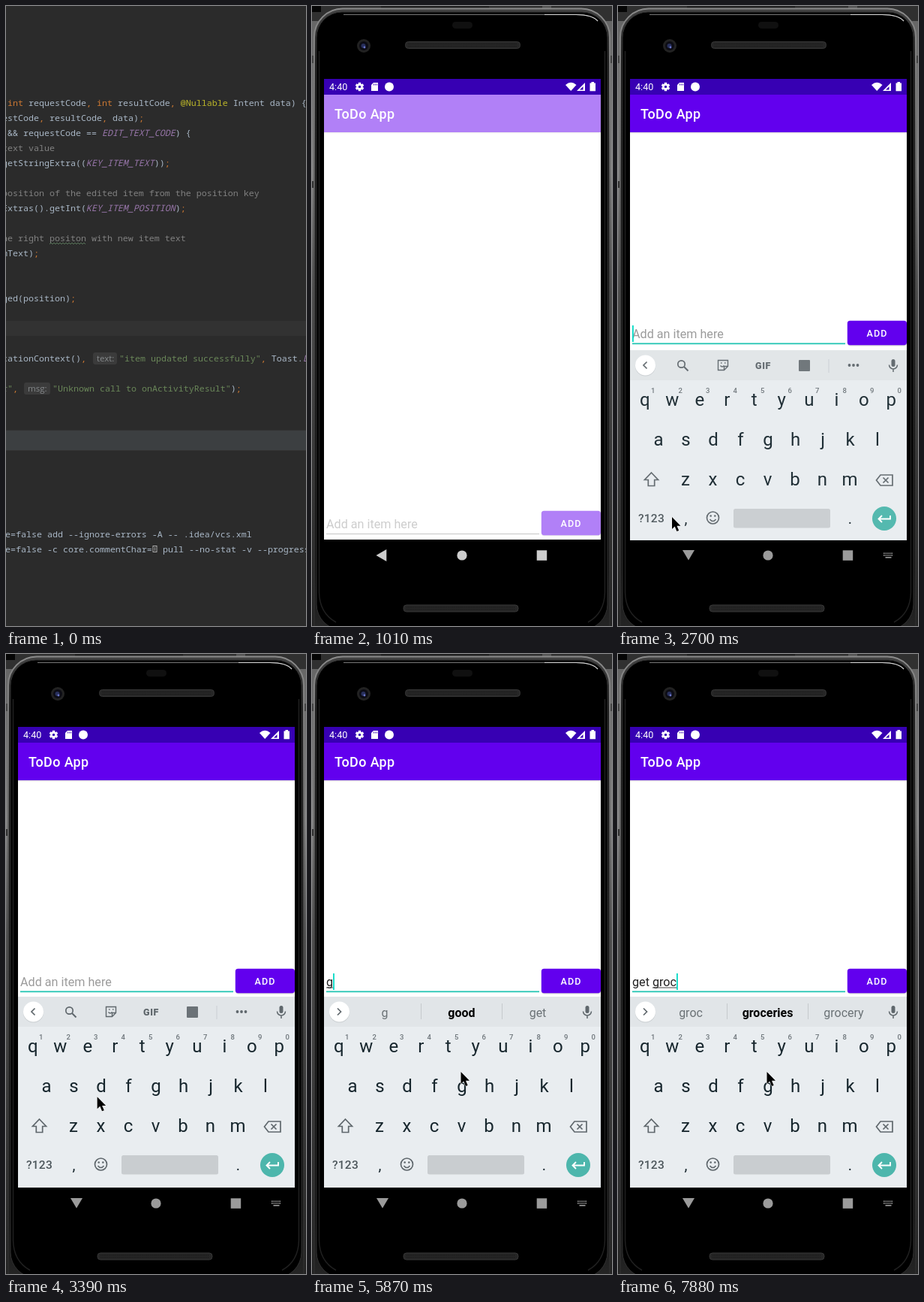
Write an HTML page that moves like this. It is 400x825 px and loops after 8 s.

```html
<!DOCTYPE html>
<html lang="en">
<head>
<meta charset="utf-8">
<title>To-do demo</title>
<style>
html, body { margin: 0; width: 100%; height: 100%; overflow: hidden; background: #2b2b2b; }
svg { display: block; width: 400px; height: 825px; }
text { white-space: pre; font-family: Roboto, sans-serif; }
.code text { font: 11.67px "Noto Sans Mono", monospace; fill: #a9b7c6; }
.code .hint { font: 11.5px "Open Sans", sans-serif; fill: #868a8c; }
.k { fill: #cc7832; } .a { fill: #bbb529; } .s { fill: #6a8759; } .c { fill: #808080; }
.f { fill: #9876aa; font-style: italic; }
.key { font-size: 24px; fill: #17262d; text-anchor: middle; }
.num { font-size: 9.5px; fill: #6c7479; text-anchor: middle; font-weight: 500; }
.word { font-size: 16px; fill: #6b7276; text-anchor: middle; }
.line { fill: none; stroke: #5f676c; stroke-width: 1.7; }
</style>
</head>
<body>
<svg id="stage" viewBox="0 0 400 825" xmlns="http://www.w3.org/2000/svg"></svg>
<script>
const stage = document.getElementById('stage');
const LOOP = 8000;

const rect = (x, y, w, h, fill, more = '') =>
  `<rect x="${x}" y="${y}" width="${w}" height="${h}" fill="${fill}" ${more}/>`;
const circle = (x, y, r, fill, more = '') =>
  `<circle cx="${x}" cy="${y}" r="${r}" fill="${fill}" ${more}/>`;
const path = (d, more = '') => `<path d="${d}" ${more}/>`;
const label = (x, y, s, more = '') => `<text x="${x}" y="${y}" ${more}>${s}</text>`;
const group = (id, body, more = '') => `<g id="${id}" ${more}>${body}</g>`;

// Code editor: ~x text~ marks a run of class x
const tint = s => s.replace(/~(\w) (.*?)~/g, '<tspan class="$1">$2</tspan>');
const row = (y, s, x = -5) => label(x, y, tint(s));
const chip = (x, y, w, s) =>
  rect(x, y, w, 16, '#3b3b3b', 'rx="3"') + label(x + 5, y + 12, s, 'class="hint"');

function editor() {
  return rect(0, 0, 400, 825, '#2b2b2b') + rect(0, 419, 400, 20, '#323232') +
    rect(0, 564, 400, 28, '#323232') + rect(0, 565, 400, 26, '#3c3f41') +
    row(133, '(~k int~ requestCode~k ,~ ~k int~ resultCode~k ,~ ~a @Nullable~ Intent data) {') +
    row(153, 'estCode~k ,~ resultCode~k ,~ data)~k ;~') +
    row(173, '&amp;&amp; requestCode == ~f EDIT_TEXT_CODE~) {', 2) +
    row(193, '~c text value~') +
    row(213, 'getStringExtra((~f KEY_ITEM_TEXT~))~k ;~') +
    row(253, '~c position of the edited item from the position key~') +
    row(273, 'Extras().getInt(~f KEY_ITEM_POSITION~)~k ;~') +
    row(313, '~c he right positon with new item text~') +
    path('M58 317' + 'l2 -2l2 2'.repeat(12), 'fill="none" stroke="#5f8060" stroke-width=".9"') +
    row(333, 'mText)~k ;~') +
    row(393, 'ged(position)~k ;~') +
    row(473, 'cationContext()~k ,~') + chip(116, 461, 32, 'text:') +
    row(473, '~s "item updated successfully"~~k ,~ Toast.~f LENGTH~', 151) +
    row(513, '~s r"~~k ,~') + chip(24, 501, 35, 'msg:') +
    row(513, '~s "Unknown call to onActivityResult"~)~k ;~', 62) +
    row(707, 'e=false add --ignore-errors -A -- .idea/vcs.xml', -1) +
    row(727, 'e=false -c core.commentChar=', -1) +
    rect(196, 718.5, 5, 8, 'none', 'stroke="#bbb" stroke-width=".9"') +
    path('M198.5 720v5', 'stroke="#999"') +
    row(727, 'pull --no-stat -v --progress', 209);
}

function speaker(x, y) {
  return rect(x, y, 153, 9, '#262626', 'rx="4" stroke="#363636" stroke-width="1"') +
    path(`M${x + 4} ${y + 3}h145M${x + 4} ${y + 6}h145`,
      'stroke="#171717" stroke-width="1.2" stroke-dasharray="1.2 1"');
}

function phone() {
  return rect(0, 0, 400, 825, '#303030') + rect(0, 0, 12, 8, '#050505') +
    rect(92, 0, 144, 3, '#202020') + rect(307, 0, 12, 8, '#555') +
    rect(0, 20, 8, 805, 'url(#side)') + rect(392, 20, 8, 805, 'url(#side)') +
    rect(0, 66, 5, 10, '#444') + rect(395, 66, 5, 10, '#444') + rect(0, 233, 5, 9, '#333') +
    rect(3, 3.5, 394, 880, 'url(#body)', 'rx="38" stroke="url(#rim)" stroke-width="2"') +
    rect(6, 8, 388, 822, '#000', 'rx="34" stroke="#303030" stroke-width="1"') +
    rect(9, 11, 382, 814, '#000', 'rx="31"') +
    path('M42 11.5H352Q374 11.5 381 20', 'fill="none" stroke="#777" stroke-width="1"') +
    path('M310 11.5H352Q374 11.5 381 20', 'fill="none" stroke="#ddd" stroke-width="1.2"') +
    path('M9.5 60V780Q10 808 32 820M390.5 60V780Q390 808 368 820',
      'fill="none" stroke="#202020" stroke-width="1.5"') +
    rect(187, 21, 27, 9, '#101010', 'rx="4.5"') +
    circle(69, 53, 9, '#222') + circle(69, 53, 6, '#0c0c14') +
    circle(68.5, 53, 3, '#28305c') + circle(70, 55, 1.4, '#6874c8') +
    speaker(124.5, 47.5) + speaker(122, 797) +
    rect(16, 97, 369, 613, '#fff');
}

function gear() {
  let teeth = '';
  for (let i = 0; i < 6; i++)
    teeth += rect(61.8, 101.8, 3.4, 4, '#fff', `transform="rotate(${i * 60} 63.5 107.5)"`);
  return teeth + circle(63.5, 107.5, 3.1, 'none', 'stroke="#fff" stroke-width="2.4"');
}

function status() {
  return rect(16, 97, 369, 21, '#3700b3') +
    label(23, 112, '4:40', 'fill="#fff" font-size="12.6"') + gear() +
    path('M82 102h6v11h-9v-8z', 'fill="#fff"') +
    path('M82.5 103.5v2M84.5 103.5v2M86.5 103.5v2', 'stroke="#3700b3" stroke-width=".9"') +
    circle(103, 107.5, 6, '#fff') +
    path('M338 105Q345.2 98.5 352.5 105L345.2 113z', 'fill="#fff"') +
    path('M364 102V113H353z', 'fill="#fff"') + path('M361.5 107V111.5H357z', 'fill="#3700b3"') +
    path('M370.5 102.5h2v-1.5h3.500v1.5h2v10.800h-7.500z', 'fill="#fff"');
}

function app() {
  return rect(16, 168, 369, 1, '#dedede') + rect(16, 169, 369, 1, '#f4f4f4') +
    rect(16, 118, 369, 50, '#6200ee') +
    label(30, 150, 'ToDo App', 'fill="#fff" font-size="17.96" font-weight="500" letter-spacing=".4"') +
    group('entry',
      rect(306, 673, 79, 32.5, '#bbb', 'rx="4" opacity=".6"') +
      rect(305.8, 671.8, 79.2, 32.4, '#6200ee', 'rx="3.6"') +
      label(345.5, 693, 'ADD', 'fill="#fff" font-size="12.57" font-weight="500" letter-spacing="1.12" text-anchor="middle"') +
      rect(19, 702, 284, 1, '#8c8c8c', 'id="rule"') +
      label(19, 695, 'Add an item here', 'id="hint" fill="#9b9b9b" font-size="16.16"') +
      label(19, 695, '', 'id="typed" fill="#212121" font-size="16.16"') +
      rect(19, 696.5, 0, 1, '#444', 'id="under"') +
      rect(19, 678, 1.8, 22, '#03dac5', 'id="caret"'));
}

function tools() {
  return path('M38.5 471.5l-4.5 4.5 4.5 4.5', 'class="line"') +
    circle(84.5, 474.5, 4.7, 'none', 'stroke="#5f676c" stroke-width="1.7"') +
    path('M88 478l5.5 5.5', 'class="line" style="stroke-width:2"') +
    path('M133.5 469.5h13v8l-5 5h-8zM146 477.5h-4.5v4.5', 'class="line" style="stroke-width:1.4"') +
    path('M136.5 476.5q2.5 3 5 0M137 473h1.5M142 473h1.5', 'class="line" style="stroke-width:1.4"') +
    label(193.5, 480.5, 'GIF', 'font-size="12.5" font-weight="900" fill="#5f676c" text-anchor="middle" letter-spacing=".6"') +
    rect(241, 469, 15, 15, '#6b7277', 'rx="1"') +
    rect(280.5, 468, 1, 18, '#cbd0d3') +
    [308.5, 314, 319.5].map(x => circle(x, 476, 1.9, '#5f676c')).join('');
}

function words() {
  return path('M34 471.5l4.5 4.5 -4.5 4.5', 'class="line"') +
    rect(145, 465, 1, 21, '#c5cacd') + rect(253, 465, 1, 21, '#c5cacd') +
    label(97, 482.5, '', 'class="word"') +
    label(199.5, 482.5, '', 'class="word" style="font-weight:700;fill:#000"') +
    label(301, 482.5, '', 'class="word"');
}

function keyRow(s, x, y, nums) {
  return [...s].map((ch, i) => label(x + i * 36.5, y, ch, 'class="key"') +
    (nums ? label(x + i * 36.5 + 11, 512.5, (i + 1) % 10, 'class="num"') : '')).join('');
}

function keyboard() {
  return rect(16, 456, 369, 254, '#e9edf0') + rect(16, 456, 369, 40, '#e1e5e8') +
    circle(36.5, 477, 13.6, '#c9ced1') + circle(36.5, 476, 13.5, '#fff') +
    group('tools', tools()) + group('words', words()) +
    rect(364.5, 468, 5, 10, '#5f676c', 'rx="2.5"') +
    path('M361.5 475.5a5.5 5.5 0 0 0 11 0M367 481v4', 'class="line" style="stroke-width:1.5"') +
    keyRow('qwertyuiop', 35.8, 529.5, true) + keyRow('asdfghjkl', 54, 582.5) + keyRow('zxcvbnm', 90, 635.5) +
    path('M44.5 619l9 9.5h-4.8v8h-8.4v-8h-4.8z', 'class="line"') +
    path('M350 622h16v14h-16l-5.5 -7zM353.5 625.5l7 7M360.5 625.5l-7 7', 'class="line"') +
    label(44.5, 685, '?123', 'font-size="15.5" font-weight="500" fill="#4c565b" text-anchor="middle" letter-spacing=".3"') +
    label(90.5, 686.5, ',', 'class="key" style="font-size:20px"') +
    label(309.5, 686.5, '.', 'class="key" style="font-size:20px"') +
    circle(126.5, 679, 8, 'none', 'class="line"') +
    circle(123.7, 676.5, 1.3, '#5f676c') + circle(129.3, 676.5, 1.3, '#5f676c') +
    path('M122.5 681q4 5 8 0', 'class="line"') +
    rect(154, 667, 129, 25.5, '#c9cdd0', 'rx="2.5"') +
    circle(355, 680, 16, '#4db6ac') +
    path('M363 676v4.5h-15M352 676l-4.5 4.5 4.5 4.5', 'fill="none" stroke="#fff" stroke-width="1.9"');
}

function navBar() {
  let dots = '';
  for (let i = 0; i < 10; i++) dots += rect(354 + (i % 5) * 2.6, 727.5 + (i > 4 ? 2.7 : 0), 1.6, 1.6, '#9b9b9b');
  return group('nav', path('M85.5 731L99.3 723V739z', 'id="back"') +
      path('M86 724H102L94 737.5z', 'id="down"') +
      circle(200, 731, 6.6, 'inherit') + rect(299.7, 724.3, 13.5, 13.5, 'inherit')) +
    group('swap', dots + rect(356.5, 733, 8, 1.6, '#9b9b9b'));
}

stage.innerHTML =
  `<defs><linearGradient id="side" x2="0" y2="1"><stop stop-color="#666"/><stop offset=".25" stop-color="#858585"/>
   <stop offset=".45" stop-color="#505050"/><stop offset="1" stop-color="#222"/></linearGradient>
   <linearGradient id="rim" x2="0" y2="1"><stop stop-color="#8a8a8a"/><stop offset=".4" stop-color="#484848"/>
   <stop offset="1" stop-color="#262626"/></linearGradient>
   <linearGradient id="body" x2="0" y2="1"><stop stop-color="#444"/><stop offset=".08" stop-color="#1c1c1c"/>
   <stop offset=".85" stop-color="#161616"/><stop offset="1" stop-color="#303030"/></linearGradient>
   <clipPath id="screen"><rect x="16" y="97" width="369" height="614"/></clipPath></defs>` +
  group('editor', editor(), 'class="code"') +
  group('phone', phone() + status() + group('app', app()) +
    `<g clip-path="url(#screen)">${group('board', keyboard())}</g>` + navBar() +
    group('mouse', path('M0 0V16L3.7 12.5 6.4 19 9.2 18 6.5 11.7H11.5z',
      'fill="#000" stroke="#fff" stroke-width="1" paint-order="stroke"')));

const ui = {};
stage.querySelectorAll('[id]').forEach(e => ui[e.id] = e);
const slots = ui.words.querySelectorAll('text');
const show = (el, on) => el.style.display = on ? '' : 'none';
const put = (el, x, y) => el.setAttribute('transform', `translate(${x} ${y})`);
const set = (el, attrs) => Object.entries(attrs).forEach(([k, v]) => el.setAttribute(k, v));
const clamp = v => Math.max(0, Math.min(1, v));

const ticks = [0, 500, 890, 1040, 1180, 1330, 1470, 1620, 1760, 1910, 2030, 2150, 2270,
  2550, 2700, 2820, 2960, 3100, 3240, 3370, 3510, 3660, 3960, 4120, 4270, 4580, 5010, 5440,
  5720, 5870, 6270, 6420, 6680, 6820, 6940, 7090, 7210, 7360, 7640, 7760, 7880];

const route = [[1330, 262, 440], [1620, 180, 570], [1910, 136, 638], [2270, 58, 690],
  [2550, 58, 690], [2700, 72, 680], [3240, 112, 610], [3510, 132, 567],
  [3660, 188, 538], [3960, 195, 550], [4270, 198.5, 556]];

// time, text, suggestions
const typing = [[0, ''], [5720, 'g'], [5870, 'g', 'g good get'], [6270, 'gr', 'gr great group'],
  [6420, 'g', 'g good get'], [6680, ''], [6820, 'g'], [6940, 'ge', 'ge get getting'],
  [7090, 'get', 'get getting gets'], [7210, 'get ', 'a the some'], [7360, 'get g', 'g good got'],
  [7640, 'get gr', 'gr great group'], [7760, 'get gro', 'gro grow ground'],
  [7880, 'get groc', 'groc groceries grocery']];

const caretOff = [[3100, 3510], [4120, 4580], [5010, 5440]];
const last = (list, test) => list.filter(test).pop();

function mouseAt(t) {
  const i = route.findIndex(p => p[0] > t);
  if (i < 0) return route[route.length - 1].slice(1);
  const a = route[Math.max(0, i - 1)], b = route[i];
  const u = clamp((t - a[0]) / (b[0] - a[0]));
  return [a[1] + (b[1] - a[1]) * u, a[2] + (b[2] - a[2]) * u];
}

function draw(time) {
  const t = last(ticks, v => v <= time);
  show(ui.editor, t < 500);
  show(ui.phone, t >= 500);
  if (t < 500) return;

  const open = t >= 2550;
  const fade = clamp((t - 740) / 300);
  ui.app.style.opacity = fade;
  const tone = Math.round(255 - 100 * fade);
  ui.nav.setAttribute('fill', `rgb(${tone},${tone},${tone})`);
  show(ui.back, !open);
  show(ui.down, open);
  show(ui.swap, open);

  const left = clamp((2820 - t) / 270);
  show(ui.board, open);
  put(ui.board, 0, Math.round(9 * left * left));
  ui.board.style.opacity = 1 - 0.5 * left ** 3;
  put(ui.entry, 0, open ? -253 : 0);
  set(ui.rule, open ? { y: 701.4, height: 1.8, fill: '#26c6b4' } : { y: 702, height: 1, fill: '#8c8c8c' });

  const [, text, tips] = last(typing, s => s[0] <= t);
  show(ui.hint, !text);
  ui.typed.textContent = text;
  const wide = text ? ui.typed.getComputedTextLength() : 0;
  const from = text.lastIndexOf(' ') + 1;
  const skip = from ? ui.typed.getSubStringLength(0, from) : 0;
  set(ui.under, { x: 19 + skip, width: tips ? wide - skip : 0 });
  set(ui.caret, { x: 19 + wide });
  show(ui.caret, open && !caretOff.some(([a, b]) => t >= a && t < b));
  show(ui.tools, !tips);
  show(ui.words, tips);
  if (tips) tips.split(' ').forEach((w, i) => slots[i].textContent = w);

  show(ui.mouse, t >= route[0][0]);
  put(ui.mouse, ...mouseAt(t));
}

function frame(now) {
  draw(now % LOOP);
  requestAnimationFrame(frame);
}
draw(0);
requestAnimationFrame(frame);
</script>
</body>
</html>
```
